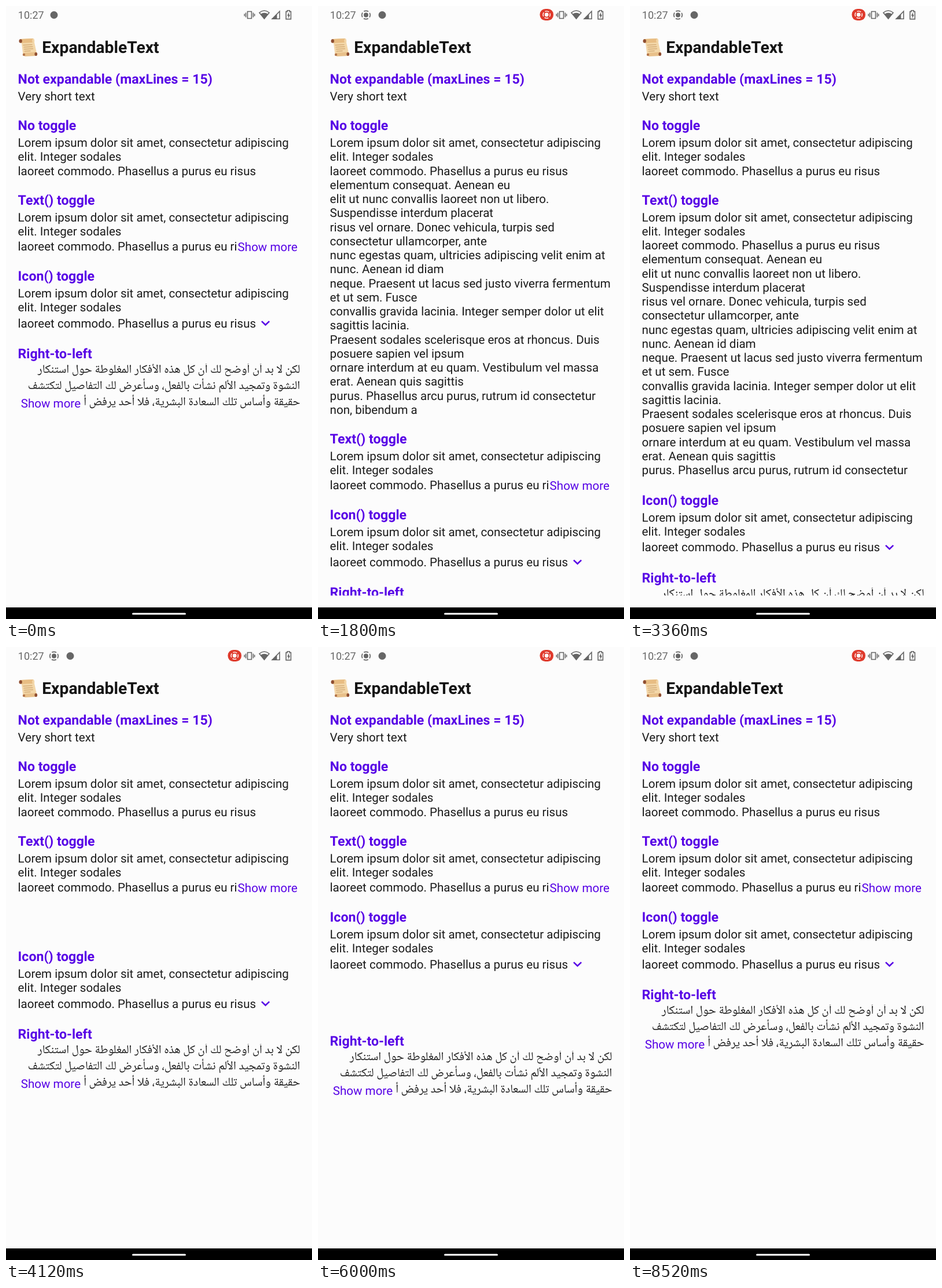
Animation of 529 by 1058 pixels, one loop 8560 ms. Source, as an HTML page:

```html
<!DOCTYPE html>
<html lang="en">
<head>
<meta charset="utf-8">
<title>ExpandableText</title>
<style>
  html, body { margin: 0; width: 100%; height: 100%; overflow: hidden; background: #fcfcfc; }
  svg text { white-space: pre; }
  #stage { display: block; width: 100vw; height: 100vh; font: 20.57px Roboto, sans-serif; fill: #1b1b1b; text-rendering: geometricPrecision; }
  .title { font-size: 28.28px; font-weight: 600; fill: #141414; }
  .heading { font-size: 23.14px; font-weight: 600; fill: #5702e6; }
  .more { fill: #5702e6; }
  .chevron { fill: none; stroke: #5702e6; stroke-width: 2.6; }
  .rtl { font-family: "Noto Naskh Arabic UI", "Noto Naskh Arabic", "Noto Sans Arabic", "DejaVu Sans", sans-serif; direction: rtl; }
  .status { fill: #666; }
  .clock { font-size: 18px; }
  .line { fill: none; stroke: #666; stroke-width: 1.6; }
</style>
</head>
<body>
<svg id="stage" viewBox="0 0 529 1058">
  <defs>
    <g id="record" fill="none" stroke-width="1.7">
      <circle r="7.2" stroke-dasharray="8.3 3" stroke-dashoffset="4.1"/>
      <circle r="2" stroke-width="4"/>
    </g>
  </defs>
  <rect width="529" height="1058" fill="#fcfcfc"/>

  <g class="status">
    <text class="clock" x="20.8" y="22.3">10:27</text>
    <circle id="app" cy="15.5" r="6.5"/>
    <g id="recording">
      <use href="#record" x="83" y="15.5" stroke="#666"/>
      <rect x="383.5" y="5" width="23.5" height="20" rx="9.5" fill="#df3a2c"/>
      <use href="#record" transform="translate(395.2 15) scale(.85)" stroke="#fff"/>
    </g>
    <path class="line" d="M417.5 9.5h7v12h-7zM414.6 11.5v8M427.4 11.5v8M412.3 13.5v4M429.7 13.5v4"/>
    <path class="line" d="M438 11.5Q446.5 4.5 455 11.5L446.5 22z"/>
    <path d="M440 14Q446.5 9.5 453 14L446.5 22.5z"/>
    <path class="line" d="M473 9.3V22.2H460.2z"/>
    <path d="M468.5 14L468.5 22.7H459.6z"/>
    <path class="line" d="M486.3 7.8h4v1.8h2.2v13h-8.4v-13h2.2z"/>
    <path d="M489.3 10.8l-3.3 6h1.9v4.4l3.3-6h-1.9z"/>
  </g>

  <g stroke-linejoin="round" stroke-linecap="round">
    <path d="M26 57L47 56Q50 57 49 63L53 81Q52 85 48 85L32 86Q29 84 29 80z" fill="#f3d7a9"/>
    <path d="M25 57L47 56Q44 59 46 63L26 64Q22 61 25 57z" fill="#e8bd83"/>
    <path d="M31 81L51 79.5Q55 82 52 86L33 87Q29 85 31 81z" fill="#e8c08a"/>
    <path d="M30 67.5l15-.7M31 71l15-.7M31.6 74.5l15-.7M32.2 78l10-.5" stroke="#c79a62" stroke-width="1.1"/>
    <ellipse cx="25.2" cy="60.5" rx="2.7" ry="3.3" fill="#8f4e31"/>
    <ellipse cx="51.8" cy="83" rx="2.4" ry="3.1" fill="#8f4e31"/>
    <circle cx="31" cy="84" r="2.2" fill="#b3744a"/>
  </g>
  <text class="title" x="62.2" y="81.4">ExpandableText</text>

  <svg id="content" width="529" height="1017.5"></svg>

  <path d="M0 1038H529V1058H0z" fill="#000"/>
  <rect x="218" y="1047.4" width="93" height="3.2" rx="1.6" fill="#fff"/>
</svg>
<script>
const LOOP = 8560, RECORDING_AT = 200;
const LEFT = 20.6, RIGHT = 508.5, TOP = 112.85, HEADING = 31.3, GAP = 24.3;
const LATIN = { pitch: 24.25, base: 19.15 };
const ARABIC = { pitch: 27.92, base: 15.5, rtl: true };

const lorem = `Lorem ipsum dolor sit amet, consectetur adipiscing
elit. Integer sodales
laoreet commodo. Phasellus a purus eu risus
elementum consequat. Aenean eu
elit ut nunc convallis laoreet non ut libero.
Suspendisse interdum placerat
risus vel ornare. Donec vehicula, turpis sed
consectetur ullamcorper, ante
nunc egestas quam, ultricies adipiscing velit enim at
nunc. Aenean id diam
neque. Praesent ut lacus sed justo viverra fermentum
et ut sem. Fusce
convallis gravida lacinia. Integer semper dolor ut elit
sagittis lacinia.
Praesent sodales scelerisque eros at rhoncus. Duis
posuere sapien vel ipsum
ornare interdum at eu quam. Vestibulum vel massa
erat. Aenean quis sagittis
purus. Phasellus arcu purus, rutrum id consectetur
non, bibendum a`.split("\n");

const arabic = `لكن لا بد أن أوضح لك أن كل هذه الأفكار المغلوطة حول استنكار
النشوة وتمجيد الألم نشأت بالفعل، وسأعرض لك التفاصيل لتكتشف
حقيقة وأساس تلك السعادة البشرية، فلا أحد يرفض أو يكره أو
يتجنب الشعور بالسعادة، ولكن بفضل هؤلاء الأشخاص الذين لا
يدركون بأن السعادة لا بد أن نستشعرها بصورة أكثر عقلانية
ومنطقية فيعرضهم هذا لمواجهة الظروف الأليمة، وأكرر بأنه لا يوجد
من يرغب في الحب ونيل المنال ويتلذذ بالآلام، الألم هو الألم ولكن
نتيجة لظروف ما قد تكمن السعاده فيما نتحمله من كد وأسي.
و سأعرض مثال حي لهذا، من منا لم يتحمل جهد بدني شاق إلا من
أجل الحصول على ميزة أو فائدة؟ ولكن من لديه الحق أن ينتقد
شخص ما أراد أن يشعر بالسعادة التي لا تشوبها عواقب أليمة أو آخر
أراد أن يتجنب الألم الذي ربما تنجم عنه بعض المتعة ؟
علي الجانب الآخر نشجب ونستنكر هؤلاء الرجال المفتونون بنشوة
اللحظة الهائمون في رغباتهم فلا يدركون ما يعقبها من الألم
والأسي المحتم، واللوم كذلك يشمل هؤلاء الذين أخفقوا في`.split("\n");

const showMore = (x, y) => `<text class="more" x="${x}" y="${y}">Show more</text>`;

// low/high: body heights; open/close: tap times; shift: third line offset when collapsed
const sections = [
  { title: "Not expandable (maxLines = 15)", lines: ["Very short text"], low: 24.25, high: 24.25 },
  { title: "No toggle", lines: lorem, low: 72.8, high: 485.1, open: 1250, close: 2310 },
  { title: "Text() toggle", lines: lorem, low: 75.7, high: 485.1, open: 3130, close: 3959,
    shift: 1.8, cut: "laoreet commodo. Phasellus a purus eu ri", toggle: showMore(400.6, 70.4) },
  { title: "Icon() toggle", lines: lorem, low: 78.3, high: 485.1, open: 5033, close: 5850,
    shift: 3.2, toggle: '<path class="chevron" d="M442 60.4l6.6 6.4 6.6-6.4"/>' },
  { title: "Right-to-left", lines: arabic, script: ARABIC, low: 84, high: 400, open: 6651, close: 7560,
    shift: 0.4, cut: "حقيقة وأساس تلك السعادة البشرية، فلا أحد يرفض أ", toggle: showMore(25.8, 75.6) },
];

const $ = id => document.getElementById(id);

function textLines(lines, { pitch, base, rtl }, from = 0, shift = 0) {
  return lines.map((line, i) =>
    `<text ${rtl ? 'class="rtl"' : ""} x="${rtl ? RIGHT : LEFT}" y="${base + pitch * (i + from) + shift}">${line}</text>`
  ).join("");
}

$("content").innerHTML = sections.map(({ title, lines, script = LATIN, shift = 0, cut, toggle = "" }) => `
  <g>
    <text class="heading" x="${LEFT}" y="21.5">${title}</text>
    <svg y="${HEADING}" width="529">
      ${textLines(lines.slice(0, 2), script)}
      <g class="full">${textLines(lines.slice(2), script, 2)}</g>
      <g class="brief">${textLines(lines.slice(2, 3).map(line => cut || line), script, 2, shift)}${toggle}</g>
    </svg>
  </g>`).join("");

sections.forEach((section, i) => {
  section.group = $("content").children[i];
  section.body = section.group.querySelector("svg");
  section.full = section.group.querySelector(".full");
  section.brief = section.group.querySelector(".brief");
});

// Distance left on a critically damped spring
function remaining(ms) {
  const x = ms * 0.02;
  return (1 + x) * Math.exp(-x);
}

function openness({ open = Infinity, close }, t) {
  if (t < open) return 0;
  return t < close ? 1 - remaining(t - open) : remaining(t - close);
}

function show(element, visible) {
  element.style.display = visible ? "" : "none";
}

function draw(now) {
  const t = now % LOOP;
  let y = TOP;
  for (const s of sections) {
    const height = s.low + (s.high - s.low) * openness(s, t);
    const expanded = t >= s.open && t < s.close;
    s.group.setAttribute("transform", `translate(0 ${y.toFixed(2)})`);
    s.body.setAttribute("height", height.toFixed(2));
    show(s.full, expanded);
    show(s.brief, !expanded);
    y += HEADING + height + GAP;
  }
  const recording = t >= RECORDING_AT;
  show($("recording"), recording);
  $("app").setAttribute("cx", recording ? 111 : 83);
  requestAnimationFrame(() => draw(performance.now() - start));
}

const start = performance.now();
draw(0);
</script>
</body>
</html>
```
